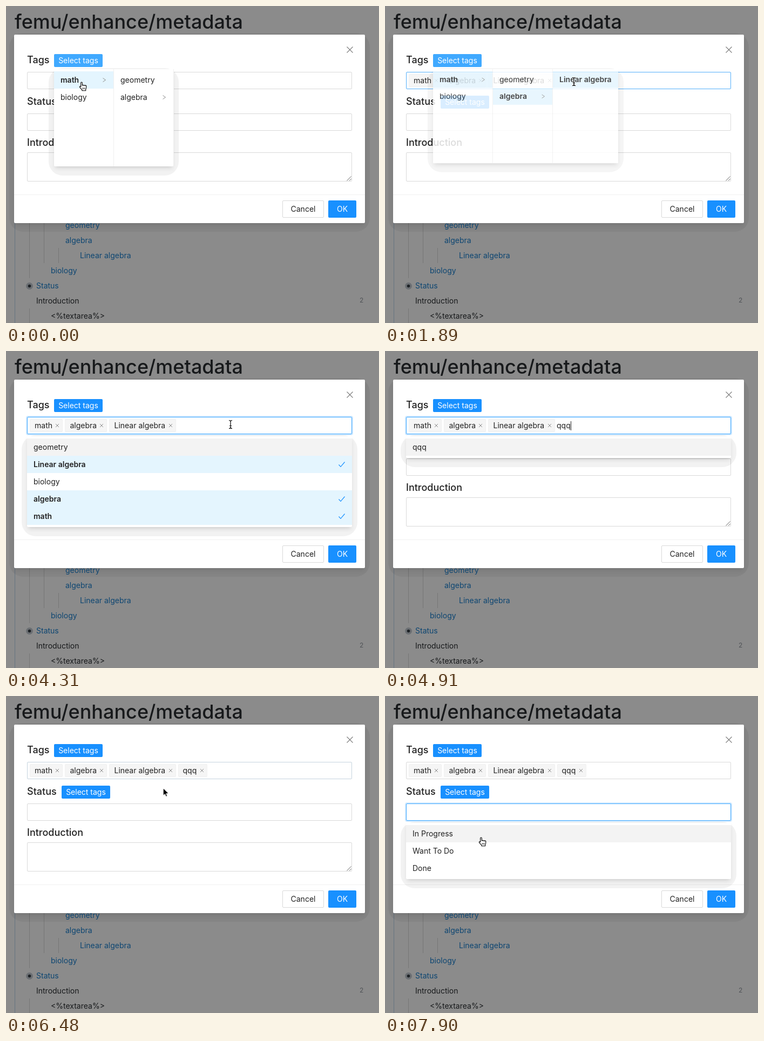
These frames come from a looping animation (691x587 px, 8 s). An HTML page:

```html
<!DOCTYPE html>
<html lang="en">
<head>
<meta charset="utf-8">
<title>Metadata dialog</title>
<style>
:root { --blue: #1890ff; --light: #40a9ff; --grey: #d9d9d9; --sel: #e4f5fe; --hover: #f3f3f3; }
* { box-sizing: border-box; }
html, body { margin: 0; width: 691px; height: 587px; overflow: hidden; }
body { position: relative; background: #8b8b8b; color: #222; font: 14px/20px Inter, sans-serif; font-optical-sizing: none; white-space: nowrap; }
svg { display: block; fill: none; overflow: visible; }
.abs, .t, .btn, .field, .pop, .line { position: absolute; }
h1 { position: absolute; left: 16px; top: 0; margin: 0; font: 500 36px/58px Inter, sans-serif; color: #17191b; }
.link { color: #0d4672; }
.line { width: 1px; background: #767676; }
.label { font-size: 18px; font-weight: 500; left: 39px; }
.btn { background: var(--blue); color: #fff; text-align: center; border-radius: 2px; }
.small { width: 90px; height: 24px; line-height: 24px; }
.big { top: 360px; height: 32px; line-height: 32px; }
.cancel { background: #fff; color: #222; border: 1px solid var(--grey); line-height: 30px; }
.field { left: 39px; width: 602px; height: 32px; background: #fff; border: 1px solid var(--grey); border-radius: 2px; }

/* floating panels: outer band plus white body */
.pop { z-index: 0; transform-origin: 0 0; }
.pop::before, .pop::after { content: ""; position: absolute; z-index: -1; }
.pop::before { inset: -2px -10px -17px; border-radius: 26px; background: rgba(0,0,0,.05); }
.pop::after { inset: 0; border-radius: 2px; background: #fff; box-shadow: 0 3px 6px -4px rgba(0,0,0,.14), 0 5px 9px -1px rgba(0,0,0,.1); }
#modal { left: 15px; top: 53px; width: 650px; height: 349px; }
#modal::before { inset: -3px -9px -16px; }
#modal::after { box-shadow: 0 5px 9px -1px rgba(0,0,0,.1); }
.drop { left: 39px; width: 602px; padding: 4px 0; }
.row { position: relative; height: 32px; line-height: 32px; padding-left: 12px; }
.row svg { position: absolute; right: 13px; top: 11px; }
.row.on { background: var(--sel); font-weight: 600; }
.row.hot { background: var(--hover); }
.col { position: absolute; top: 0; width: 111px; height: 180px; padding-top: 4px; border-right: 1px solid #f0f0f0; }
.col svg { right: 14px; top: 12px; }
.chips { display: flex; gap: 4px; left: 44px; top: 126px; }
.chip { display: flex; align-items: center; height: 24px; padding: 0 4px 0 8px; background: #f5f5f5; border: 1px solid #f0f0f0; border-radius: 2px; }
.chip svg { margin-left: 4.4px; }
.caret { width: 1px; height: 17px; background: #222; }
i { font-style: normal; }

.step { animation: 8s step-end infinite; }
.flow { animation: 8s linear infinite; }

#menu { left: 89px; top: 117px; height: 180px; animation: widen 8s step-end infinite, shut 8s linear infinite; }
@keyframes widen { 0% { width: 221px } 7.5%, 100% { width: 343px } }
@keyframes shut {
  0%, 21.75% { opacity: 1; transform: none; animation-timing-function: cubic-bezier(.755,.05,.855,.06) }
  24.375%, 100% { opacity: 0; transform: scaleY(.8) }
}
#third { left: 222px; width: 121px; border: 0; animation-name: third; }
@keyframes third { 0% { visibility: hidden } 7.5%, 100% { visibility: visible } }
#algebra { animation: tint1 8s linear infinite, bold1 8s step-end infinite; }
#linear { animation: tint2 8s linear infinite, bold2 8s step-end infinite; }
@keyframes tint1 { 0%, 6.5% { background: #fff } 9.5%, 100% { background: var(--sel) } }
@keyframes tint2 { 0%, 20% { background: #fff } 23%, 100% { background: var(--sel) } }
@keyframes bold1 { 0% { font-weight: 400 } 7.5%, 100% { font-weight: 600 } }
@keyframes bold2 { 0% { font-weight: 400 } 20.5%, 100% { font-weight: 600 } }

.picked { animation-name: picked; }
.added { animation-name: added; }
@keyframes picked { 0% { visibility: hidden } 21%, 100% { visibility: visible } }
@keyframes added { 0% { visibility: hidden } 65.125%, 100% { visibility: visible } }

#tags { top: 122px; animation: tagBorder 8s linear infinite, tagGlow 8s linear infinite; }
@keyframes tagBorder {
  0%, 21.25% { border-color: var(--grey) }
  24%, 28.125% { border-color: var(--light) }
  31.75%, 33.5% { border-color: var(--grey) }
  34.8%, 77.7% { border-color: var(--light) }
  81.5%, 100% { border-color: var(--grey) }
}
@keyframes tagGlow {
  0%, 35.6% { box-shadow: 0 0 0 2px rgba(24,144,255,0) }
  38%, 77.7% { box-shadow: 0 0 0 2px rgba(24,144,255,.2) }
  80.8%, 100% { box-shadow: 0 0 0 2px rgba(24,144,255,0) }
}
#status { top: 199px; animation: statBorder 8s linear infinite, statGlow 8s linear infinite; }
@keyframes statBorder { 0%, 82.5% { border-color: var(--grey) } 85.625%, 100% { border-color: var(--light) } }
@keyframes statGlow {
  0%, 88% { box-shadow: 0 0 0 2px rgba(24,144,255,0) }
  91%, 100% { box-shadow: 0 0 0 2px rgba(24,144,255,.2) }
}
#tagBtn { animation-name: blur; }
@keyframes blur { 0%, 35.5% { background: var(--light) } 38.75%, 100% { background: var(--blue) } }

#tagDrop { top: 158px; animation: tagDrop 8s linear infinite, tagSize 8s step-end infinite; }
@keyframes tagDrop {
  0%, 35.5% { opacity: 0; transform: scaleY(.8); animation-timing-function: cubic-bezier(.23,1,.32,1) }
  38.125%, 78.125% { opacity: 1; transform: none; animation-timing-function: cubic-bezier(.755,.05,.855,.06) }
  80.625%, 100% { opacity: 0; transform: scaleY(.8) }
}
@keyframes tagSize { 0% { height: 168px } 57.625% { height: 40px } 65.125%, 100% { height: 200px } }
#all { animation-name: all; }
@keyframes all { 0% { opacity: 1 } 57.625% { opacity: 0 } 65.125%, 100% { opacity: 1 } }
#match { position: absolute; left: 0; right: 0; top: 4px; }
.k1 { animation-name: k1; } .k2 { animation-name: k2; } .k3 { animation-name: k3; }
@keyframes k1 { 0% { visibility: hidden } 57.625% { visibility: visible } 65.125%, 100% { visibility: hidden } }
@keyframes k2 { 0% { visibility: hidden } 59.125% { visibility: visible } 65.125%, 100% { visibility: hidden } }
@keyframes k3 { 0% { visibility: hidden } 61.375% { visibility: visible } 65.125%, 100% { visibility: hidden } }

#statDrop { top: 235px; height: 104px; animation-name: statDrop; }
@keyframes statDrop {
  0%, 88.6% { opacity: 0; transform: scaleY(.8); animation-timing-function: cubic-bezier(.23,1,.32,1) }
  91.5%, 100% { opacity: 1; transform: none }
}

#caret1 { top: 130px; animation: caretX 8s step-end infinite, blink1 8s step-end infinite; }
@keyframes caretX { 0% { left: 318px } 57.625% { left: 327px } 59.125% { left: 335px } 61.375% { left: 344px } 65.125%, 100% { left: 376px } }
@keyframes blink1 {
  0%, 41.875%, 53.875%, 67.25%, 77.6%, 100% { opacity: 0 }
  35.625%, 47.875%, 57.625%, 73.125% { opacity: 1 }
}
#caret2 { left: 51px; top: 206px; animation-name: blink2; }
@keyframes blink2 { 0%, 94.25%, 100% { opacity: 0 } 88.375% { opacity: 1 } }

#cursor { left: 0; top: 0; z-index: 9; animation-name: move; }
@keyframes move {
  0%, 2.4% { transform: translate(140px, 141px) }
  4.375%, 6% { transform: translate(303px, 142px) }
  7.5%, 12.5% { transform: translate(275px, 167px) }
  14.5% { transform: translate(302px, 158px) }
  17%, 26.6% { transform: translate(350px, 140px) }
  31.75%, 33% { transform: translate(372px, 193px) }
  34.6%, 34.95% { transform: translate(392px, 131px) }
  37%, 73% { transform: translate(416px, 136px) }
  73.125% { transform: translate(420px, 105px) }
  73.875%, 77.7% { transform: translate(422px, 89px) }
  81% { transform: translate(291px, 170px) }
  83.5% { transform: translate(232px, 204px) }
  86.125%, 93.6% { transform: translate(201px, 211px) }
  95.75%, 97.3% { transform: translate(175px, 268px) }
  98.75%, 100% { transform: translate(178px, 262px) }
}
#hand { animation-name: hand; } #beam { animation-name: beam; } #arrow { animation-name: arrow; }
@keyframes hand { 0%, 94.75%, 100% { visibility: visible } 22.25% { visibility: hidden } }
@keyframes beam {
  0%, 28.125%, 57.625%, 94.75%, 100% { visibility: hidden }
  22.25%, 34.125%, 83% { visibility: visible }
}
@keyframes arrow { 0%, 34.125%, 83%, 100% { visibility: hidden } 28.125%, 73.125% { visibility: visible } }
</style>
</head>
<body>
<svg class="abs" width="0" height="0">
  <symbol id="x" viewBox="0 0 10 10"><path d="M2 2l6 6M8 2l-6 6" stroke="#8c8c8c"/></symbol>
  <symbol id="check" viewBox="0 0 12 10"><path d="M.5 5.5 4 9.3 11.5.5" stroke="#1890ff" stroke-width="1.2"/></symbol>
  <symbol id="chev" viewBox="0 0 6 8"><path d="M.5.5 5.5 4 .5 7.5" stroke="#8c8c8c"/></symbol>
  <path id="bar" d="M-3-7.5Q0-7.5 0-5.5V5.5Q0 7.5-3 7.5M3-7.5Q0-7.5 0-5.5M0 5.5Q0 7.5 3 7.5M-2 2.5h4"/>
</svg>

<h1>femu/enhance/metadata</h1>
<div class="line" style="left:16px;top:402px;height:185px;background:#667380"></div>
<div class="line" style="left:43px;top:402px;height:102px"></div>
<div class="line" style="left:70px;top:402px;height:74px"></div>
<div class="line" style="left:97px;top:448px;height:28px"></div>
<div class="line" style="left:43px;top:560px;height:27px"></div>

<div class="pop" id="modal"></div>

<div class="abs" style="left:0;top:402px;width:691px;height:185px;overflow:hidden">
  <div class="t link" style="left:110px;top:-6px">geometry</div>
  <div class="t link" style="left:110px;top:22px">algebra</div>
  <div class="t link" style="left:137px;top:50px">Linear algebra</div>
  <div class="t link" style="left:83px;top:78px">biology</div>
  <div class="t link" style="left:56px;top:106px">Status</div>
  <div class="t" style="left:56px;top:134px;color:#17191b">Introduction</div>
  <div class="t" style="left:83px;top:162px;color:#17191b">&lt;%textarea%&gt;</div>
  <div class="t" style="left:655px;top:133px;font-size:12px;color:#505357">2</div>
  <svg class="abs" style="left:36px;top:109px" width="15" height="15"><circle cx="7.5" cy="7.5" r="6.5" fill="#6b6f73"/><circle cx="7.5" cy="7.5" r="2.8" fill="#1c2125"/></svg>
</div>

<svg class="abs" style="left:631px;top:75px" width="12" height="12"><path d="M.5.5l11 11M11.5.5l-11 11" stroke="#808080" stroke-width="1.2"/></svg>
<div class="t label" style="top:90px">Tags</div>
<div class="btn small flow" id="tagBtn" style="left:89px;top:89px">Select tags</div>
<div class="field" id="tags"></div>
<div class="abs chips">
  <div class="chip step picked">math<svg width="10" height="10"><use href="#x"/></svg></div>
  <div class="chip step picked">algebra<svg width="10" height="10"><use href="#x"/></svg></div>
  <div class="chip step picked">Linear algebra<svg width="10" height="10"><use href="#x"/></svg></div>
  <div class="chip step added">qqq<svg width="10" height="10"><use href="#x"/></svg></div>
</div>
<div class="t" style="left:318px;top:128px"><i class="step k1">q</i><i class="step k2">q</i><i class="step k3">q</i></div>
<div class="abs caret" id="caret1"></div>

<div class="t label" style="top:167px">Status</div>
<div class="btn small" style="left:103px;top:166px">Select tags</div>
<div class="field" id="status"></div>
<div class="abs caret step" id="caret2"></div>

<div class="t label" style="top:243px">Introduction</div>
<div class="field" style="top:271px;height:54px"></div>
<svg class="abs" style="left:631px;top:315px" width="9" height="9"><path d="M.5 8.5l8-8M5 8.5l3.5-3.5" stroke="#666"/></svg>

<div class="abs" style="left:15px;top:349px;width:650px;height:1px;background:#f0f0f0"></div>
<div class="btn big cancel" style="left:512px;width:77px">Cancel</div>
<div class="btn big" style="left:597px;width:52px">OK</div>

<div class="pop drop" id="tagDrop">
  <div class="step" id="all">
    <div class="row hot">geometry</div>
    <div class="row on">Linear algebra<svg width="12" height="10"><use href="#check"/></svg></div>
    <div class="row">biology</div>
    <div class="row on">algebra<svg width="12" height="10"><use href="#check"/></svg></div>
    <div class="row on">math<svg width="12" height="10"><use href="#check"/></svg></div>
    <div class="row on step added">qqq<svg width="12" height="10"><use href="#check"/></svg></div>
  </div>
  <div class="row hot step k1" id="match"><i>q</i><i class="step k2">q</i><i class="step k3">q</i></div>
</div>

<div class="pop drop flow" id="statDrop">
  <div class="row hot">In Progress</div>
  <div class="row">Want To Do</div>
  <div class="row">Done</div>
</div>

<div class="pop" id="menu">
  <div class="col" style="left:0">
    <div class="row on">math<svg width="6" height="8"><use href="#chev"/></svg></div>
    <div class="row">biology</div>
  </div>
  <div class="col" style="left:111px">
    <div class="row">geometry</div>
    <div class="row" id="algebra">algebra<svg width="6" height="8"><use href="#chev"/></svg></div>
  </div>
  <div class="col step" id="third">
    <div class="row" id="linear">Linear algebra</div>
  </div>
</div>

<svg class="abs flow" id="cursor" width="1" height="1">
  <g class="step" id="hand" transform="translate(-5.3 -1.3)" stroke="#000" stroke-width="1.1" stroke-linejoin="round">
    <path fill="#fff" d="M4 2.6a1.3 1.3 0 0 1 2.6 0V7.4a1.3 1.1 0 0 1 2.5.2a1.3 1.1 0 0 1 2.4.5a1.2 1.1 0 0 1 2.5.6c.3 2.6 0 4.6-1 6V17H6.2v-1.3C5 14.4 3 12 1.8 10.4c-.6-1 .5-2 1.4-1.4L4 9.8z"/>
    <path d="M7.3 11.5v3M9.3 11.5v3M11.3 11.5v3" stroke-width=".8"/>
  </g>
  <g class="step" id="beam">
    <use href="#bar" stroke="#fff" stroke-width="2.6" stroke-opacity=".8"/>
    <use href="#bar" stroke="#000" stroke-width="1.2"/>
  </g>
  <path class="step" id="arrow" d="M.5.5v13.8l3.1-3 2.1 4.9 2.4-1-2.1-4.7h4.5z" fill="#000" stroke="#fff"/>
</svg>
</body>
</html>
```
